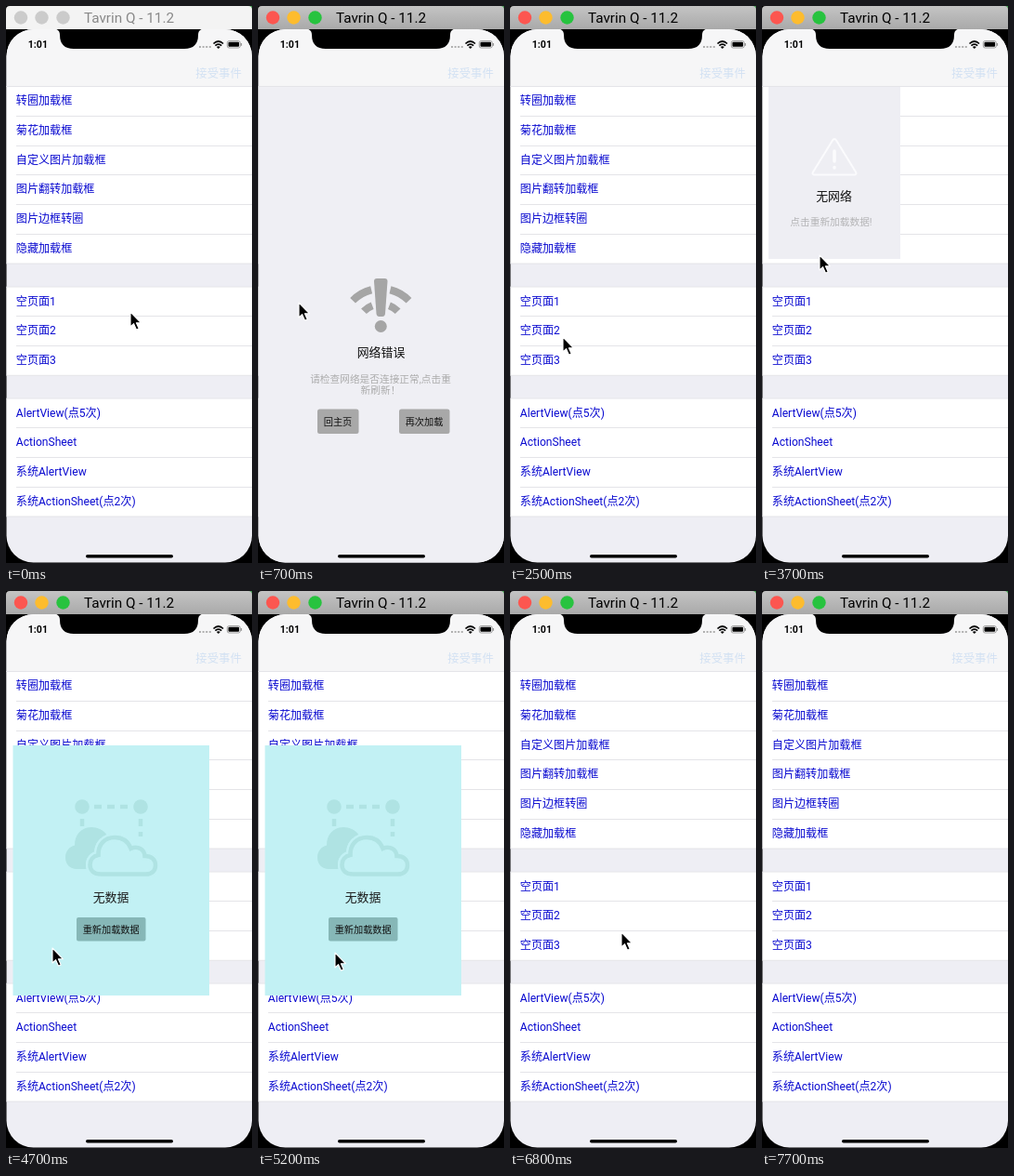
Recreate the animation shown at these times as an HTML page. Size 265 by 599 pixels, loop 7800 ms.

```html
<!DOCTYPE html>
<html lang="zh-CN">
<head>
<meta charset="utf-8">
<title>Empty page demo</title>
<style>
html, body { margin: 0; width: 100%; height: 100%; overflow: hidden; background: #000; }
svg { display: block; width: 265px; height: 599px; }
text { font-family: Roboto, "Noto Sans CJK SC", "Noto Sans CJK", sans-serif; }
.mid { text-anchor: middle; }
.row { font-size: 12.1px; fill: #0a0ad0; }
.btn { font-size: 10.2px; fill: #111; }
.line { stroke: #e4e4e8; stroke-width: 1; }
#bar { fill: url(#active); }
.idle #bar { fill: #f3f3f3; }
.idle .lamp { fill: #cbcbcb; }
.idle #name { fill: #888; }
#reload { --bg: #ebebf2; --art: #dedee1; --key: #a7a7a7; }
#reload.cyan { --bg: #c2f1f4; --art: #afe3e3; --key: #86b7b7; }
#reload .bg { fill: var(--bg); }
#reload .key { fill: var(--key); }
</style>
</head>
<body>
<svg id="stage" viewBox="0 0 265 599">
  <defs>
    <linearGradient id="active" x2="0" y2="1">
      <stop offset="0" stop-color="#c4c4c4"/>
      <stop offset="1" stop-color="#a9a9a9"/>
    </linearGradient>
    <clipPath id="screen"><rect x="0.5" y="25" width="264.5" height="573.5" rx="29"/></clipPath>
  </defs>

  <!-- window title -->
  <rect width="265" height="599"/>
  <rect x="259" width="6" height="5" fill="#3f9a4c"/>
  <path id="bar" d="M0 25V4q0-4 4-4H261q4 0 4 4V25Z"/>
  <circle class="lamp" cx="16" cy="12.5" r="7.2" fill="#fc5650"/>
  <circle class="lamp" cx="38.5" cy="12.5" r="7.2" fill="#fdbc2e"/>
  <circle class="lamp" cx="61.5" cy="12.5" r="7.2" fill="#27c33f"/>
  <text id="name" class="mid" x="132.5" y="18.3" font-size="15.3">Tavrin Q - 11.2</text>

  <g clip-path="url(#screen)">
    <rect y="25" width="265" height="574" fill="#eeeef4"/>
    <g id="list"></g>

    <g id="error">
      <rect y="87" width="265" height="512" fill="#efeff4"/>
      <g fill="#a5a5a5">
        <path d="M125 296q0-3 3-3h8.500q3 0 3 3L137 331q-.5 3-3 3h-3.500q-2.500 0-3-3Z"/>
        <circle cx="132.300" cy="344.500" r="6.500"/>
      </g>
      <g id="waves" fill="none" stroke="#a5a5a5" stroke-width="8"></g>
      <text class="mid" x="132.500" y="376.800" font-size="12.900" fill="#111">网络错误</text>
      <g class="mid" font-size="10.700" fill="#acacac">
        <text x="132" y="404.500">请检查网络是否连接正常,点击重</text>
        <text x="132" y="417">新刷新！</text>
      </g>
      <rect x="64" y="433.500" width="44.500" height="26.500" rx="2.500" fill="#a8a8a8"/>
      <rect x="152" y="433.500" width="54.500" height="26.500" rx="2.500" fill="#a8a8a8"/>
      <text class="btn mid" x="86" y="450.700">回主页</text>
      <text class="btn mid" x="179" y="450.700">再次加载</text>
    </g>

    <g id="offline">
      <rect x="7" y="87" width="142" height="185" fill="#eeeef3"/>
      <g fill="none" stroke="#fbfbfd" stroke-linejoin="round" stroke-linecap="round">
        <path stroke-width="2" d="M76 144.500Q78 141.500 80 144.500L101 178.500Q102.500 181.500 99 181.500H57Q53.500 181.500 55 178.500Z"/>
        <path stroke-width="3.500" d="M78 156V167M78 173.500V174"/>
      </g>
      <text class="mid" x="77.500" y="208.800" font-size="12.900" fill="#111">无网络</text>
      <text class="mid" x="74.500" y="236.300" font-size="10.700" fill="#b4b4b6">点击重新加载数据!</text>
    </g>

    <g id="reload">
      <rect class="bg" x="7.500" y="166" width="211.500" height="269"/>
      <g style="fill:var(--art)">
        <circle cx="82" cy="232" r="7.800"/>
        <circle cx="145" cy="232" r="7.800"/>
        <path d="M76 299C69 299 64 294 64 286.500C64 280 68 275 74 273.500C74 262 81 254 92 254C101 254 108 259 111 267L100 299Z"/>
      </g>
      <path d="M95 232H133M82 245V256M145 245V264" fill="none" style="stroke:var(--art)" stroke-width="4.500" stroke-dasharray="8 6"/>
      <path id="cloud" d="M102 304.500C94 304.500 90.500 300 90.500 294.500C90.500 289 94 285 99.500 284C99 273 106 265 117 265C126 265 132 270 134.500 277C142 273.500 149 278 149.500 285C157 285 161 289 161 295C161 301 157 304.500 151 304.500Z" style="fill:var(--bg);stroke:var(--bg)" stroke-width="9"/>
      <use href="#cloud" style="stroke:var(--art)"/>
      <path d="M102 304.500C94 304.500 90.500 300 90.500 294.500C90.500 289 94 285 99.500 284C99 273 106 265 117 265C126 265 132 270 134.500 277C142 273.500 149 278 149.500 285C157 285 161 289 161 295C161 301 157 304.500 151 304.500Z" fill="none" style="stroke:var(--art)" stroke-width="4.500"/>
      <text class="mid" x="113" y="333.800" font-size="12.900" fill="#1a1a1a">无数据</text>
      <rect class="key" x="76" y="351" width="74.500" height="25.500" rx="2"/>
      <text class="btn mid" x="113.200" y="367.600">重新加载数据</text>
    </g>

    <!-- navigation and status -->
    <rect y="25" width="265" height="61.500" fill="#f6f6f7"/>
    <path class="line" d="M0 86.500H265"/>
    <text x="204.300" y="76.500" font-size="12.400" font-weight="500" fill="#d2e1f3">接受事件</text>
    <path d="M52 24.500Q58 25 58 31Q58 46 73 46H192Q207 46 207 31Q207 25 213 24.500Z"/>
    <text x="23.800" y="45" font-size="10.600" font-weight="700">1:01</text>
    <path d="M208 44h13" stroke="#999" stroke-width="1.600" stroke-dasharray="2 1.600"/>
    <g fill="none" stroke="#000" stroke-width="1.700">
      <path d="M223.500 40.500Q228.800 35.500 234 40.500M225.400 42.700Q228.800 39.500 232.200 42.700"/>
    </g>
    <path d="M226.800 44Q228.800 42.500 230.800 44L228.800 46Z"/>
    <rect x="238.300" y="37.600" width="14" height="7.400" rx="2" fill="none" stroke="#888" stroke-width=".8"/>
    <rect x="239.500" y="38.800" width="11.600" height="5" rx="1"/>
    <path d="M253.600 40v2.800" stroke="#888"/>
    <rect x="86" y="590" width="94" height="3.500" rx="1.750"/>
  </g>

  <path id="cursor" d="M0 0V16L3.600 12.700L6.500 19.200L9.200 18L6.400 11.700H11.300Z" stroke="#fff" stroke-width="1.100" stroke-linejoin="round"/>
</svg>
<script>
const LOOP = 7800, STEP = 100;
const $ = id => document.getElementById(id);

const sections = [
  [86.5, ['转圈加载框', '菊花加载框', '自定义图片加载框', '图片翻转加载框', '图片边框转圈', '隐藏加载框']],
  [302, ['空页面1', '空页面2', '空页面3']],
  [422, ['AlertView(点5次)', 'ActionSheet', '系统AlertView', '系统ActionSheet(点2次)']]
];
const ROW = 31.75;

$('list').innerHTML = sections.map(([top, rows]) => {
  const h = rows.length * ROW;
  const items = rows.map((label, i) => {
    const y = top + i * ROW;
    const rule = i ? `<path class="line" d="M11 ${Math.floor(y) + .5}H265"/>` : '';
    return rule + `<text class="row" x="10.8" y="${y + 19.6}">${label}</text>`;
  }).join('');
  return `<rect y="${top}" width="265" height="${h}" fill="#fff"/>
    <path class="line" d="M0 ${top}H265M0 ${top + h}H265"/>${items}`;
}).join('');

// One arc around the dot of the signal icon, angles in degrees
function arc(r, from, to) {
  const at = a => {
    const q = a * Math.PI / 180;
    return `${132.3 + r * Math.cos(q)} ${346 + r * Math.sin(q)}`;
  };
  return `<path d="M${at(from)}A${r} ${r} 0 0 1 ${at(to)}"/>`;
}
$('waves').innerHTML = [[42, 14], [25.5, 21]].map(([r, gap]) =>
  arc(r, -136, -90 - gap) + arc(r, -90 + gap, -44)).join('');

// Pointer stops: time, x, y
const stops = [
  [0, 134, 329], [500, 44, 319], [800, 44, 319], [1300, 172, 477],
  [1600, 177, 450], [1900, 177, 450], [2500, 57, 356], [2700, 52, 351],
  [3000, 52, 351], [3700, 62, 268], [3900, 66, 246], [4000, 66, 246],
  [4500, 50, 384], [4800, 50, 384], [5200, 83, 389], [5500, 112, 366],
  [5800, 112, 366], [6200, 124, 388], [6500, 120, 367], [6800, 120, 367],
  [7400, 272, 430], [7800, 272, 430]
];

function pointer(t) {
  const i = stops.findIndex(s => s[0] > t);
  const [a, x, y] = stops[i - 1], [b, u, v] = stops[i];
  const p = (t - a) / (b - a), e = p * p * (3 - 2 * p);
  return [x + (u - x) * e, y + (v - y) * e];
}

const show = (id, on) => $(id).style.display = on ? '' : 'none';
const within = (t, a, b) => t >= a && t < b;

function draw() {
  const t = Math.floor(performance.now() % LOOP / STEP) * STEP;
  $('stage').classList.toggle('idle', t < 500);
  show('error', within(t, 700, 1900));
  show('offline', within(t, 2900, 4000));
  show('reload', within(t, 4700, 6800));
  $('reload').classList.toggle('cyan', t < 5700);
  $('cursor').setAttribute('transform', `translate(${pointer(t)})`);
  requestAnimationFrame(draw);
}
draw();
</script>
</body>
</html>
```
